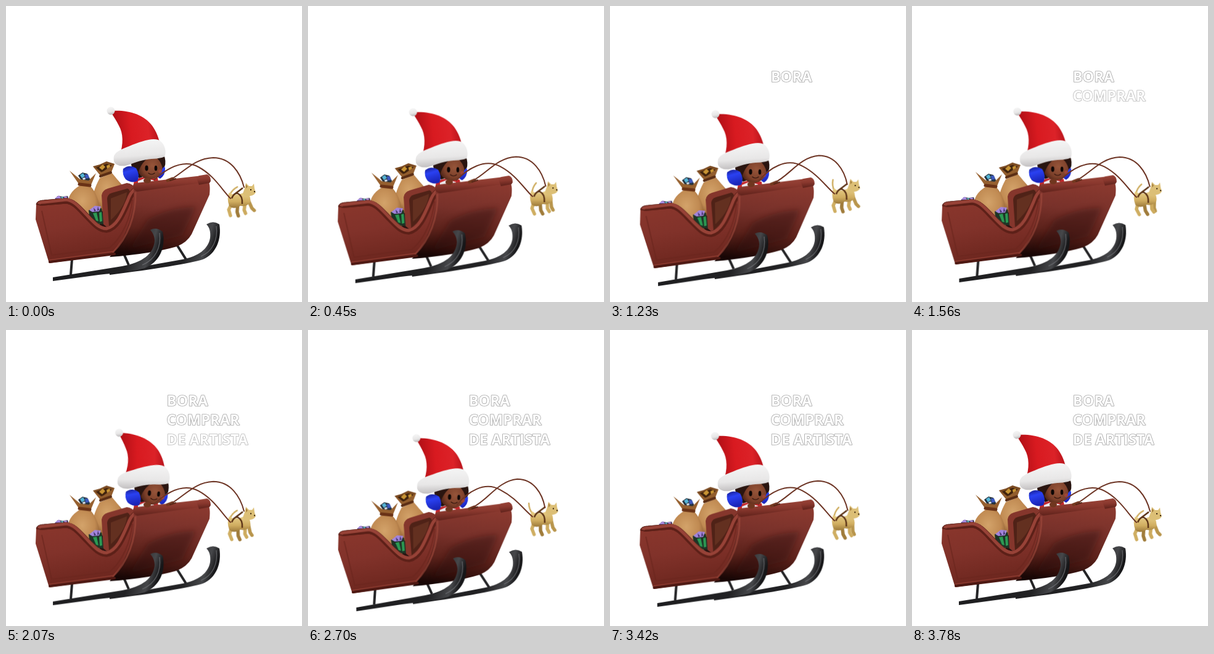
An HTML page that plays this animation: 480 px wide and 480 px high, repeating every 3.84 s.

```html
<!DOCTYPE html>
<html lang="pt">
<head>
<meta charset="utf-8">
<title>Bora comprar de artista</title>
<style>
html, body { margin: 0; width: 100%; height: 100%; overflow: hidden; background: #fff; }
svg { display: block; width: 100%; height: 100%; }

/* slow rocking shared by sled, head, reins and dog */
.rock { animation: 960ms cubic-bezier(.55, 0, .75, 1) infinite alternate; }
#sled { animation-name: pitch; transform-origin: 700px 300px; }
#nod { animation-name: nod; transform-origin: 235px 280px; }
#dog { animation-name: bob; }
#tail { animation-name: wag; transform-origin: 363px 306px; }
#rein1 { animation-name: rein1; }
#rein2 { animation-name: rein2; }
@keyframes pitch { to { transform: rotate(-1.1deg); } }
@keyframes nod { to { transform: rotate(2deg); } }
@keyframes bob { to { transform: translate(1px, -10px); } }
@keyframes wag { from { transform: rotate(75deg); } }
@keyframes rein1 {
  from { d: path("M240 282 C258 266 286 247 312 261 C338 275 350 298 364 312"); }
  to { d: path("M242 284 C258 262 286 244 312 259 C336 271 350 290 364 301"); }
}
@keyframes rein2 {
  from { d: path("M268 281 C290 268 306 247 336 246 C364 246 380 270 386 294"); }
  to { d: path("M266 289 C290 280 308 244 340 241 C366 241 380 264 384 287"); }
}

/* one lean of the head per loop */
#lean { animation: lean 3840ms ease-in-out infinite; transform-origin: 235px 280px; }
@keyframes lean {
  0%, 38% { transform: none; }
  56% { transform: translate(3px, 2px) rotate(5.5deg); }
  80%, 100% { transform: none; }
}

/* trot */
.leg { animation: 320ms ease-in-out infinite alternate; }
.l1 { animation-name: back; transform-origin: 367px 318px; }
.l2 { animation-name: fwd; transform-origin: 376px 320px; }
.l3 { animation-name: back; transform-origin: 388px 318px; }
.l4 { animation-name: lift; transform-origin: 393px 315px; }
@keyframes back { from { transform: rotate(8deg); } to { transform: rotate(-4deg); } }
@keyframes fwd { from { transform: rotate(9deg); } to { transform: rotate(-6deg); } }
@keyframes lift { from { transform: rotate(-24deg); } to { transform: rotate(3deg); } }

text {
  font: 700 23.7px "Open Sans", "Noto Sans", sans-serif;
  fill: #fff; stroke: #a6a6a6; stroke-width: 1.7; stroke-linejoin: round; paint-order: stroke;
  animation: 3840ms linear infinite;
}
#t1 { animation-name: show1; }
#t2 { animation-name: show2; }
#t3 { animation-name: show3; }
@keyframes show1 { 0%, 17% { opacity: 0; } 26%, 100% { opacity: 1; } }
@keyframes show2 { 0%, 33% { opacity: 0; } 43%, 100% { opacity: 1; } }
@keyframes show3 { 0%, 46% { opacity: 0; } 56%, 100% { opacity: 1; } }
</style>
</head>
<body>
<svg viewBox="0 0 480 480">
  <defs>
    <linearGradient id="gSide" x1="0" y1="0" x2=".25" y2="1">
      <stop offset="0" stop-color="#8d382d"/><stop offset=".55" stop-color="#81322a"/><stop offset="1" stop-color="#6c261e"/>
    </linearGradient>
    <linearGradient id="gFront" x1=".58" y1="0" x2=".42" y2="1">
      <stop offset="0" stop-color="#8a392f"/><stop offset=".35" stop-color="#78312a"/><stop offset=".65" stop-color="#5c221b"/><stop offset=".86" stop-color="#35110d"/><stop offset="1" stop-color="#170605"/>
    </linearGradient>
    <linearGradient id="gRail" x1="0" y1="0" x2=".1" y2="1">
      <stop offset="0" stop-color="#9a4539"/><stop offset=".5" stop-color="#8a382e"/><stop offset="1" stop-color="#5f221b"/>
    </linearGradient>
    <linearGradient id="gSteel" x1="0" y1="0" x2="1" y2=".15">
      <stop offset="0" stop-color="#1c1c1e"/><stop offset=".75" stop-color="#222224"/><stop offset=".92" stop-color="#46474a"/><stop offset="1" stop-color="#161618"/>
    </linearGradient>
    <radialGradient id="gSack" cx=".45" cy=".4" r=".65">
      <stop offset="0" stop-color="#d3a36a"/><stop offset=".6" stop-color="#c08a52"/><stop offset="1" stop-color="#85552c"/>
    </radialGradient>
    <linearGradient id="gHat" x1="0" y1=".4" x2="1" y2=".3">
      <stop offset="0" stop-color="#a90d14"/><stop offset=".4" stop-color="#d81a20"/><stop offset=".75" stop-color="#dc2228"/><stop offset="1" stop-color="#ae0f17"/>
    </linearGradient>
    <linearGradient id="gFur" x1=".4" y1="0" x2=".6" y2="1">
      <stop offset="0" stop-color="#f6f6f6"/><stop offset=".6" stop-color="#e8e7e7"/><stop offset="1" stop-color="#b9b6b7"/>
    </linearGradient>
    <radialGradient id="gFace" cx=".6" cy=".5" r=".6">
      <stop offset="0" stop-color="#96553a"/><stop offset=".65" stop-color="#7b3f29"/><stop offset="1" stop-color="#4a2216"/>
    </radialGradient>
    <linearGradient id="gHair" x1="0" y1="0" x2=".3" y2="1">
      <stop offset="0" stop-color="#151a86"/><stop offset=".4" stop-color="#2a41f2"/><stop offset="1" stop-color="#1a25b8"/>
    </linearGradient>
    <linearGradient id="gDog" x1="0" y1="0" x2="0" y2="1">
      <stop offset="0" stop-color="#e9d08a"/><stop offset=".6" stop-color="#d0ad60"/><stop offset="1" stop-color="#9c793a"/>
    </linearGradient>
    <filter id="soft" x="-30%" y="-30%" width="160%" height="160%"><feGaussianBlur stdDeviation="5"/></filter>
  </defs>

  <g id="sled" class="rock">
    <!-- far runner and struts -->
    <path stroke="#242426" stroke-width="4" d="M107 411 L105 436 M188 395 L199 420 M275 384 L292 411"/>
    <path fill="url(#gSteel)" d="M168 432 L286 411 C312 406 328 394 331 376 C332 366 330 359 325 354 Q336 347 346 354 C350 378 341 402 319 411 C300 417 240 427 168 436 Z"/>

    <!-- inside -->
    <path fill="#2a1210" d="M118 330 L162 322 L170 362 L156 358 Z"/>
    <path fill="#39304c" d="M76 316 L84 308 L92 309 L100 308 L103 318 Z"/>
    <path fill="#a78be0" d="M79 312 L86 307 L89 312 Z M93 309 L99 309 L98 314 Z"/>
    <path fill="#5fb5b9" d="M88 310 l5 -1 -1 4 Z"/>

    <g transform="translate(0 3)">
      <!-- right sack -->
      <path fill="url(#gSack)" d="M152 276 C145 290 137 305 142 330 L186 330 L192 292 C186 284 180 278 172 268 Z"/>
      <path fill="#7a4a22" d="M141 257 L152 254 L163 249 L176 253 L170 268 L154 273 Z"/>
      <path fill="#3f220d" d="M146 259 L163 253 L172 256 L166 264 L154 266 Z"/>
      <path fill="#c89434" d="M151 259 l6 -5 4 4 -5 5 Z M163 256 l5 -2 1 4 -5 3 Z"/>
      <path fill="#925d2d" d="M141 257 L155 267 L176 253 L170 268 L154 273 Z"/>
      <path stroke="#5a2d14" stroke-width="4" stroke-linecap="round" d="M153 273 L170 267"/>
      <!-- left sack -->
      <path fill="url(#gSack)" d="M120 288 C106 296 98 308 100 326 L152 352 C155 325 150 303 136 288 Z"/>
      <path fill="#23313d" d="M117 272 L124 267 L132 269 L137 279 L126 286 Z"/>
      <path fill="#55b5d6" d="M120 271 l5 -3 3 5 -5 3 Z"/>
      <path fill="#3d59bd" d="M128 270 l5 0 2 6 -6 1 Z"/>
      <path fill="#d9e3ee" d="M124 276 l4 -1 1 3 -4 1 Z"/>
      <path fill="#96602f" d="M103 264 L120 278 L134 280 L146 268 L138 287 L119 287 Z"/>
      <path stroke="#6a3216" stroke-width="5" stroke-linecap="round" d="M119 286 L136 288"/>
    </g>

    <!-- gifts in the middle -->
    <path fill="#1e3326" d="M134 331 L155 328 L160 354 L150 353 L135 340 Z"/>
    <path fill="#a284dc" d="M135 331 l9 -7 10 1 -3 8 -11 1 Z"/>
    <path fill="#3f3065" d="M142 327 l4 5 -3 1 Z M149 325 l2 6 -3 1 Z"/>
    <path fill="#2c9a53" d="M141 336 l6 -1 3 14 -4 -1 Z M151 335 l4 -1 1 15 -4 1 Z"/>

    <!-- seat -->
    <path fill="#85362c" d="M155 307 Q156 299 165 296 L196 287 Q206 288 210 297 L212 304 Q190 346 168 362 L158 354 Z"/>
    <path fill="#4f2217" d="M164 312 Q165 305 172 303 L197 296 Q203 298 200 308 Q190 340 167 357 Z"/>
    <path fill="#633020" d="M170 312 L196 302 Q195 324 170 347 Z"/>

    <!-- driver -->
    <path fill="#c4262a" d="M208 282 Q225 274 246 279 L248 290 L206 294 Z"/>
    <path fill="#ececf0" d="M214 284 L226 279 L240 283 L238 290 L214 292 Z"/>
    <g id="lean"><g id="nod" class="rock">
      <path fill="#21120f" d="M204 250 Q228 234 257 244 Q261 258 254 266 L216 279 Q201 268 204 250 Z"/>
      <path fill="url(#gHair)" d="M243 264 Q252 256 258 262 Q259 274 250 280 Q241 276 243 264 Z"/>
      <ellipse cx="233" cy="259" rx="21" ry="22" fill="url(#gFace)"/>
      <path fill="#2a1510" d="M203 248 L236 243 Q219 252 214 272 Q201 264 203 248 Z"/>
      <path fill="#2a1510" d="M242 244 L257 244 Q259 256 254 264 Q252 252 242 244 Z"/>
      <path fill="url(#gHair)" d="M190 264 Q200 256 211 263 Q218 274 213 284 Q203 288 194 281 Q188 273 190 264 Z"/>
      <g fill="#0d0605">
        <ellipse cx="228" cy="263" rx="2.6" ry="4.4"/><ellipse cx="243" cy="263" rx="2.3" ry="4.3"/>
      </g>
      <circle cx="250" cy="268" r="3" fill="#b5473a" opacity=".6"/>
      <path fill="none" stroke="#2a100b" stroke-width="1.2" stroke-linecap="round" d="M231 271 Q236 275 241 271"/>
      <path fill="url(#gHat)" d="M170 170 C197 168 223 175 237 194 C244 204 248 214 250 226 L184 243 C191 224 190 206 183 194 C179 186 175 180 170 172 Z"/>
      <path fill="url(#gFur)" transform="rotate(2 216 240)" d="M175 249 C174 239 185 234 199 228 C218 220 234 213 246 216 C257 220 261 236 257 243 C245 248 236 246 222 250 C206 254 196 262 185 260 C177 258 175 255 175 249 Z"/>
      <circle cx="170" cy="170" r="6.5" fill="url(#gFur)"/>
    </g></g>

    <!-- body -->
    <path fill="url(#gSide)" d="M49 322 Q50 316 60 316 L98 312 C113 313 120 324 132 337 C144 351 152 360 163 361 C180 357 189 337 197 315 Q202 300 208 296 L220 300 L200 399 L70 417 L48 346 Z"/>
    <path fill="none" stroke="#6b271f" stroke-width="2" opacity=".7" d="M58 332 L74 404 L168 392 C190 374 202 342 205 314"/>
    <g fill="none" stroke-linejoin="round">
      <path id="rim" stroke="#5c2018" stroke-width="9" d="M53 323 Q54 319 62 319 L98 316 C112 318 120 330 132 342 C144 355 152 363 163 363 C180 360 189 338 198 317 Q203 303 210 298"/>
      <use href="#rim" style="stroke:#9d4638"/>
      <path stroke="#974237" stroke-width="5" d="M53 321 Q54 318 62 318 L98 314 C112 316 120 328 132 340 C144 353 152 361 163 361 C179 358 188 337 197 316 Q202 302 209 297"/>
    </g>
    <path fill="url(#gFront)" d="M207 297 L327 283 Q332 287 330 306 L301 370 Q294 383 277 390 Q235 402 168 407 C192 382 209 340 207 297 Z"/>
    <path fill="#2a0b08" opacity=".4" filter="url(#soft)" d="M230 346 Q268 325 308 326 L286 372 L200 394 Z"/>
    <path fill="none" stroke="#a04a3d" stroke-width="3" opacity=".6" d="M210 302 C211 340 197 376 173 400"/>
    <path fill="none" stroke="#4d1812" stroke-width="4" stroke-linecap="round" d="M71 415 L176 402"/>
    <path fill="none" stroke="#8c3b30" stroke-width="1.5" d="M70 412 L174 398"/>
    <path fill="url(#gRail)" d="M206 292 Q206 288 211 287 L318 275 L322 286 L213 301 Q206 299 206 292 Z"/>
    <path fill="url(#gRail)" d="M309 279 Q310 276 314 275 L326 273 Q332 275 332 284 L330 287 L313 290 Z"/>

    <!-- hands -->
    <ellipse cx="229" cy="283" rx="6" ry="4.5" fill="#70361f"/>
    <path stroke="#74391f" stroke-width="5" stroke-linecap="round" d="M262 283 L270 280"/>
    <path stroke="#522414" stroke-width="2" stroke-linecap="round" d="M266 283 L275 280"/>

    <!-- near runner -->
    <path fill="url(#gSteel)" d="M76 440 L188 422 C222 416 239 402 241 381 C241 373 238 368 234 363 Q244 358 254 366 C260 392 248 416 225 425 C208 430 180 433 150 436 L76 446 Z"/>
    <path fill="none" stroke="#77787c" stroke-width="1.3" opacity=".7" d="M249 368 C252 392 242 411 221 420"/>
    <path fill="none" stroke="#77787c" stroke-width="1.3" opacity=".7" d="M341 357 C344 379 335 398 316 406"/>
  </g>

  <g id="dog" class="rock">
    <path id="tail" class="rock" fill="none" stroke="#cfae62" stroke-width="2.5" stroke-linecap="round" d="M363 306 Q356 300 354 291"/>
    <g fill="none" stroke-linecap="round" stroke-linejoin="round" stroke-width="5.5">
      <path class="leg l2" stroke="#a07c3b" d="M376 320 L377 334 L380 340"/>
      <path class="leg l4" stroke="#b8954c" d="M393 315 L393 329 L395 334"/>
      <path class="leg l1" stroke="#cfae62" d="M367 318 L363 331 L367 340"/>
      <path class="leg l3" stroke="#cdab5f" d="M388 318 L388 331 L391 336"/>
    </g>
    <path fill="url(#gDog)" d="M361 304 Q363 301 366 305 L376 306 L388 302 Q398 306 396 318 Q391 326 380 324 Q369 331 362 324 Q358 314 361 304 Z"/>
    <path fill="none" stroke="#5d3518" stroke-width="2.5" d="M366 312 Q370 302 376 304 Q384 308 383 321 M372 304 Q379 299 384 295"/>
    <path fill="#dcbf76" d="M384 304 L387 296 L389 287 L394 292 L399 292 L402 288 L403 296 L405 302 Q403 307 396 308 Q387 311 384 304 Z"/>
    <path fill="#a8813f" d="M389 289 L392 293 L389 296 Z"/>
    <path fill="#38230f" d="M396 297 h2 v2 h-2 Z M402 300 h2 v2 h-2 Z"/>
  </g>

  <g fill="none" stroke="#6d3525" stroke-width="2" stroke-linecap="round">
    <path id="rein1" class="rock"/>
    <path id="rein2" class="rock"/>
  </g>

  <text id="t1" x="260.7" y="123">BORA</text>
  <text id="t2" x="260.4" y="154">COMPRAR</text>
  <text id="t3" x="260.4" y="186">DE ARTISTA</text>
</svg>
</body>
</html>
```
